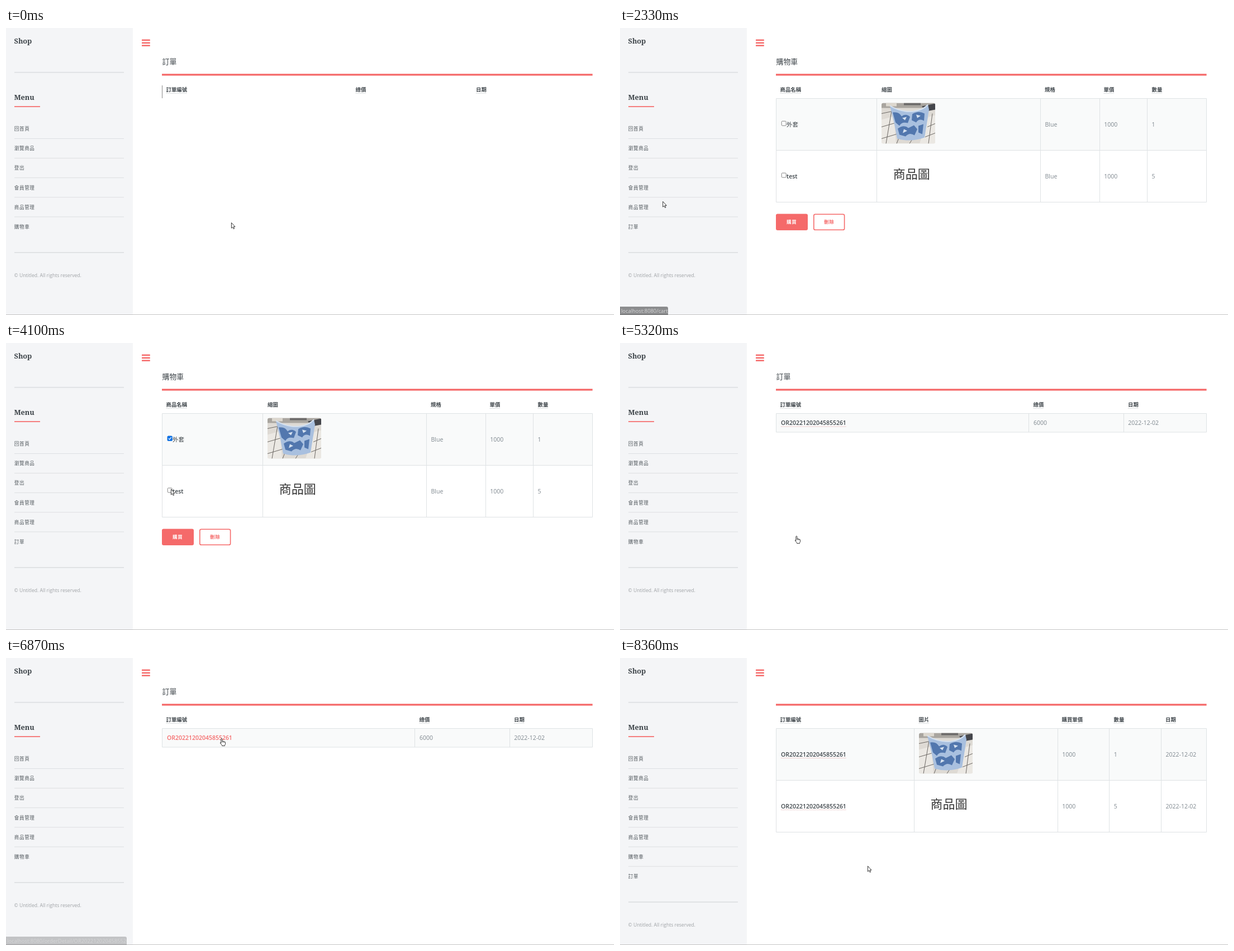
Write an HTML page that moves like this. It is 1088 by 515 pixels and loops after 9820 ms.

```html
<!DOCTYPE html>
<html lang="zh-Hant">
<head>
<meta charset="utf-8">
<title>Shop</title>
<style>
html, body { margin: 0; width: 100%; height: 100%; overflow: hidden; background: #fff; }
svg { display: block; width: 1088px; height: 515px; }
text { font-family: "Open Sans", "Noto Sans CJK TC", "Noto Sans CJK", sans-serif; white-space: pre; }
.head { font: 700 12.8px "Roboto Slab", "Noto Serif", serif; fill: #3d4449; letter-spacing: -.1px; }
.menu { font-size: 8.55px; letter-spacing: .075em; fill: #51585d; }
.copy { font-size: 8.6px; fill: #9fa3a6; }
.title { font-size: 12.9px; font-weight: 500; fill: #3d4449; }
.th { font-size: 9.4px; font-weight: 600; fill: #3d4449; }
.cell { font-size: 10.5px; fill: #7f888f; }
.name { font-size: 10.5px; font-weight: 600; fill: #3d4449; }
.cjk { font-weight: 500; }
.ph { font-size: 22px; fill: #333; }
.btn { font-size: 8.5px; font-weight: 700; letter-spacing: .075em; }
.url { font-family: "Open Sans", "Noto Sans", sans-serif; font-size: 9.4px; fill: #fff; }
</style>
</head>
<body>
<svg id="stage" viewBox="0 0 1088 515" xmlns="http://www.w3.org/2000/svg"></svg>
<script>
const RED = '#f56a6a', GRID = '#dee2e4', ORDER = 'OR20221202045855261';
const $ = id => document.getElementById(id);

const text = (x, y, cls, s, extra = '') => `<text x="${x}" y="${y}" class="${cls}" ${extra}>${s}</text>`;
const rect = (x, y, w, h, fill, extra = '') => `<rect x="${x}" y="${y}" width="${w}" height="${h}" fill="${fill}" ${extra}/>`;
const path = (d, extra) => `<path d="${d}" ${extra}/>`;
const group = (id, body, extra = '') => `<g id="${id}" ${extra}>${body}</g>`;
const dots = (x, y, w, color = '#b9bfc2', id = '') =>
  path(`M${x} ${y}h${w}`, `${id && `id="${id}"`} stroke="${color}" stroke-width=".8" stroke-dasharray="1 .7" fill="none"`);

// Table header labels: [x, label, underlined]
const header = list => list.map(([x, s, line = true]) =>
  text(x, 114.4, 'th', s) + (line ? dots(x, 117.5, s.length * 9.4) : '')).join('');

function grid(cols, rows) {
  const [l, r] = [cols[0], cols[cols.length - 1]], [top, bottom] = [rows[0], rows[rows.length - 1]];
  const d = cols.map(x => `M${x} ${top}V${bottom}`).join('') + rows.map(y => `M${l} ${y}H${r}`).join('');
  return rect(l, top, r - l, rows[1] - top, '#f9fafa') +
    path(d, `stroke="${GRID}" stroke-width="1" fill="none"`);
}

function photo(x) {
  return `<g transform="translate(${x} 134.5)" clip-path="url(#round)">
    ${rect(0, 0, 96, 73, '#dedad4')}
    ${rect(0, 0, 96, 9, '#a9a59f')}${rect(8, 0, 19, 6, '#dcd7ce')}${rect(40, 0, 30, 4, '#6c6a69')}
    ${path('M0 30L22 24 26 73H0ZM84 25L96 22V73H68Z', 'fill="#ebe8e3"')}
    ${path('M0 19L19 15M0 43L24 36M0 64L30 55M8 73L18 14M27 73L32 60M82 43L96 37M78 61L96 54M84 73L91 19M50 73L55 65', 'stroke="#6b6763" stroke-width="1" fill="none"')}
    ${path('M72 6L96 1V12L80 15Z', 'fill="#45464b"')}
    ${path('M15 5Q35 17 57 15 74 13 83 3L85 12 77 62Q52 71 28 64L23 38Z', 'fill="#a9c0df"')}
    ${path('M20 17Q31 15 36 24 44 18 51 25L47 36Q36 33 32 41L25 35ZM55 20Q66 13 77 19L76 32Q67 27 62 35L54 31ZM29 46Q40 38 48 45L58 40 64 47 59 58Q50 52 43 60L32 57ZM66 41L75 38 73 56 66 53Z', 'fill="#5277ae"')}
    ${path('M37 27L45 25 42 31ZM62 21L70 23 64 27ZM40 47L46 50 38 54Z', 'fill="#d6e2f0"')}
    ${path('M15 5Q35 17 57 15 74 13 83 3', 'stroke="#d7e3f1" stroke-width="2" fill="none"')}
  </g>`;
}

function box(id, y) {
  return rect(289.2, y, 8, 8, '#fff', 'rx="1.4" stroke="#767676" stroke-width=".9"') +
    group(id, rect(288.7, y - .5, 9, 9, '#0b72e7', 'rx="1.5"') +
      path(`M290.8 ${y + 4.1}l1.8 1.8 3.3-4`, 'fill="none" stroke="#fff" stroke-width="1.3"'));
}

const link = (y, n) => text(288, y, 'name', ORDER, `id="link${n}"`) + dots(288, y + 2.8, 117, '#e5a0a0', `line${n}`);
const cells = (y, list) => list.map(([x, s]) => text(x, y, 'cell', s)).join('');

const frame = rect(0, 0, 227, 515, '#f4f5f7') +
  text(14.5, 28.2, 'head', 'Shop') + rect(15, 78.8, 196, 1.7, '#dddfe2') +
  text(14.5, 129, 'head', 'Menu') + rect(15, 140.2, 46, 1.7, RED) +
  [20.6, 25.4, 30.2].map(y => rect(243, y, 14.8, 2.5, RED, 'rx=".5"')).join('') +
  rect(279, 82.2, 770.6, 3.3, RED) +
  ['回首頁', '瀏覽商品', '登出', '會員管理', '商品管理'].map((s, i) =>
    text(14.8, 184.1 + 35.15 * i, 'menu', s) + rect(15, 198 + 35.1 * i, 196, 1, '#dddfe2')).join('') +
  text(14.8, 359.9, 'menu', '', 'id="last"') + dots(15, 361, 27.5, RED, 'lastLine') +
  group('extra', rect(15, 373.5, 196, 1, '#dddfe2') + text(14.8, 395, 'menu', '訂單')) +
  group('foot', rect(15, 402, 196, 1.7, '#dddfe2') + text(14.6, 447, 'copy', '© Untitled. All rights reserved.'));

const empty = text(279.5, 64.6, 'title', '訂單') +
  header([[286.5, '訂單編號'], [625.5, '總價'], [841, '日期']]);

const cart = text(279.5, 64.6, 'title', '購物車') +
  header([[286.5, '商品名稱'], [468, '縮圖', false], [760, '規格', false], [865.5, '單價'], [951.5, '數量']]) +
  grid([279.5, 459.5, 752.5, 858.5, 943.5, 1049.5], [126.5, 219.5, 312.5]) +
  box('check1', 167.2) + text(298, 176.7, 'name cjk', '外套') +
  box('check2', 260.2) + text(298, 269.6, 'name', 'test') +
  photo(468) + text(488.8, 269.6, 'ph', '商品圖') +
  cells(176.7, [[760.5, 'Blue'], [866.3, '1000'], [951.4, '1']]) +
  cells(269.6, [[760.5, 'Blue'], [866.3, '1000'], [951.4, '5']]) +
  rect(279, 333.5, 57, 29.6, RED, 'id="buy" rx="3"') + text(298, 351.4, 'btn', '購買', 'fill="#fff"') +
  rect(346.8, 334.3, 54.8, 28, '#fff', `rx="2.6" stroke="${RED}" stroke-width="1.6"`) +
  text(365, 351.4, 'btn', '刪除', `fill="${RED}"`);

const orders = text(279.5, 64.6, 'title', '訂單') +
  header([[286.5, '訂單編號'], [739.5, '總價'], [909, '日期']]) +
  grid([279.5, 731.5, 901.5, 1049.5], [126.5, 160]) + link(147.2, 0) +
  cells(147.2, [[740, '6000'], [909.3, '2022-12-02']]);

const detail = header([[286.5, '訂單編號'], [534.5, '圖片'], [790.5, '購買單價'], [883.5, '數量'], [976, '日期']]) +
  grid([279.5, 526.5, 783.5, 875.5, 968.5, 1049.5], [126.5, 219.5, 312.5]) +
  link(176.7, 1) + link(269.6, 2) + photo(535) + text(555.5, 269.6, 'ph', '商品圖') +
  cells(176.7, [[791.2, '1000'], [883.8, '1'], [976.5, '2022-12-02']]) +
  cells(269.6, [[791.2, '1000'], [883.8, '5'], [976.5, '2022-12-02']]);

const ink = 'fill="#fff" stroke="#222" stroke-width=".9" stroke-linejoin="round"';
const cursors =
  group('arrow', path('M.4 .4V10.2L2.6 8.2 4.2 11.6 5.7 10.9 4.2 7.6H7Z', ink)) +
  group('hand', path('M1.8 8.6V1.6Q1.8 .5 2.8 .5T3.9 1.6V5.3Q5.6 4.6 5.8 5.8 7.4 5 7.7 6.4 9.4 5.9 9.5 7.4V9.8Q9.4 11.4 8.5 12.4V13.6H3.6V12.6L.6 8.9Q0 7.9 .8 7.6 1.4 7.5 1.8 8.6Z', ink) +
    path('M3.9 5.3V7.6M5.8 5.8V7.8M7.7 6.4V8', 'stroke="#222" stroke-width=".7"')) +
  group('beam', path('M-2 -5.2Q0 -5.2 0 -4 0 -5.2 2 -5.2M0 -4V4M-2 5.2Q0 5.2 0 4 0 5.2 2 5.2', 'fill="none" stroke="#222" stroke-width="1"'));

const pages = { empty, cart, orders, detail };
$('stage').innerHTML = '<defs><clipPath id="round"><rect width="96" height="73" rx="3.5"/></clipPath></defs>' +
  rect(0, 0, 1088, 515, '#fff') + frame +
  Object.entries(pages).map(([id, body]) => group(id, body)).join('') +
  rect(279, 103, 1, 23, '#8a8a8a', 'id="caret"') +
  rect(0, 514, 1088, 1, '#c3c3c3') +
  group('status', path('', 'id="bar" fill="#202124"') + text(2, 511, 'url', '', 'id="url"')) +
  group('mouse', cursors);

// Pointer path: [time, x, y]
const track = [
  [0, 403, 349], [440, 403, 349], [530, 402, 353], [1110, 402, 353], [1450, 215, 372], [1780, 52, 350],
  [1850, 45.5, 345], [2000, 45.5, 340], [2060, 41, 337.5], [2260, 41, 337.5], [2560, 190, 225], [2880, 309, 168],
  [3020, 293, 169], [3220, 293, 169], [3650, 289, 212], [4100, 295, 262], [4170, 295, 262], [4310, 294, 258],
  [4450, 294, 258], [4720, 304, 305], [4930, 313, 346], [5320, 313, 346], [5460, 315, 343],
  [5920, 315, 343], [6300, 352, 240], [6670, 383, 144], [7350, 383, 144], [7470, 379, 141],
  [7640, 379, 141], [7670, 383, 149], [7750, 383, 149], [8060, 420, 265], [8360, 443, 373], [9820, 443, 373]
];
// Pointer shape from each time on
const shapes = [
  [0, 'arrow'], [1780, 'hand'], [2330, 'arrow'], [2820, 'beam'], [2950, 'arrow'],
  [4860, 'hand'], [5390, 'arrow'], [6600, 'hand'], [7810, 'arrow']
];

const within = (t, a, b) => t >= a && t < b;
const ramp = (t, a, b) => Math.min(1, Math.max(0, (t - a) / (b - a)));
const show = (id, on) => $(id).style.display = on ? '' : 'none';

function pointer(t) {
  const i = track.findIndex((k, n) => n && t <= k[0]);
  const [a, b] = [track[i - 1], track[i]];
  const p = ramp(t, a[0], b[0]);
  return [1, 2].map(n => (a[n] + (b[n] - a[n]) * p).toFixed(1));
}

function render(t) {
  const page = t < 2260 ? 'empty' : t < 5320 ? 'cart' : t < 7670 ? 'orders' : 'detail';
  const more = page === 'detail';
  for (const id in pages) show(id, id === page);

  show('caret', t < 530 || within(t, 1050, 1590));
  const cartHover = within(t, 1780, 2260);
  $('last').textContent = page === 'cart' ? '訂單' : '購物車';
  $('last').style.fill = cartHover ? RED : '';
  show('lastLine', cartHover);
  show('extra', more);
  $('foot').setAttribute('transform', `translate(0 ${more ? 35 : 0})`);

  show('check1', t >= 3220);
  show('check2', t >= 4310);
  $('buy').setAttribute('fill', t >= 4860 ? '#f67878' : RED);
  const orderHover = within(t, 6600, 7670);
  $('link0').style.fill = orderHover ? RED : '';
  show('line0', !orderHover);

  const first = t < 5000, width = first ? 86 : 216;
  const alpha = first ? (t < 2260 ? .73 * ramp(t, 1780, 1850) + .27 * ramp(t, 1850, 1960) : 1 - ramp(t, 2260, 2400))
    : ramp(t, 6850, 6940) * (1 - ramp(t, 7860, 8000));
  $('bar').setAttribute('d', `M0 500H${width - 3}Q${width} 500 ${width} 503V515H0Z`);
  $('url').textContent = 'localhost:8080/' + (first ? 'cart' : 'orderDetail/' + ORDER);
  $('bar').style.opacity = alpha;
  $('url').style.opacity = Math.min(1, alpha * 1.35);

  const shape = shapes.filter(s => s[0] <= t).pop()[1];
  for (const id of ['arrow', 'hand', 'beam']) show(id, id === shape);
  $('mouse').setAttribute('transform', `translate(${pointer(t).join(' ')})`);
}

const start = performance.now();
function tick() {
  render((performance.now() - start) % 9820);
  requestAnimationFrame(tick);
}
tick();
</script>
</body>
</html>
```
